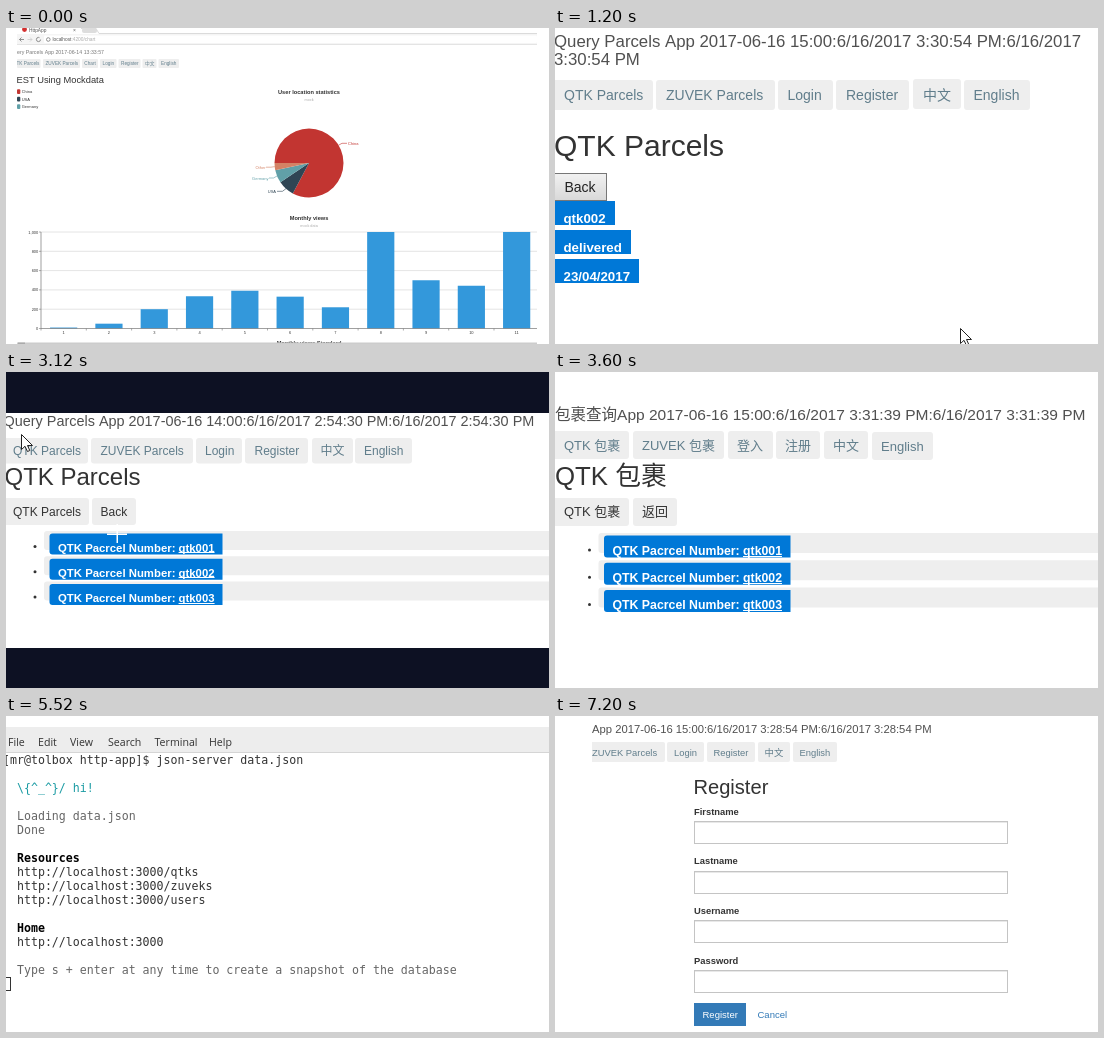
These frames come from a looping animation (543 px wide and 316 px high, 8400 ms). An HTML page with a canvas:

```html
<!DOCTYPE html>
<html lang="en">
<head>
<meta charset="utf-8">
<title>Parcel app tour</title>
<style>
  html, body { margin: 0; width: 100%; height: 100%; overflow: hidden; background: #fff; }
  canvas { display: block; }
</style>
</head>
<body>
<canvas id="stage" width="543" height="316"></canvas>
<script>
const W = 543, H = 316, HOLD = 1200;
const ctx = document.getElementById('stage').getContext('2d');
const SANS = '"Liberation Sans", Arial, "Noto Sans CJK SC", "Noto Sans CJK", sans-serif';
const MONO = '"DejaVu Sans Mono", monospace';
const MENU = '"Open Sans", "Noto Sans", sans-serif';
const INK = '#333', TITLE = '#505050', NAV = '#607d8b', CHIP = '#eee', BLUE = '#0078d7', LINK = '#337ab7';

function text(str, x, y, size, color = INK, { bold = false, align = 'left', font = SANS } = {}) {
  ctx.font = `${bold ? 'bold ' : ''}${size}px ${font}`;
  ctx.textAlign = align;
  ctx.fillStyle = color;
  ctx.fillText(str, x, y);
}

function rect(x, y, w, h, color, radius = 0) {
  ctx.fillStyle = color;
  ctx.beginPath();
  ctx.roundRect(x, y, w, h, radius);
  ctx.fill();
}

function line(points, color, width = 1) {
  ctx.strokeStyle = color;
  ctx.lineWidth = width;
  ctx.beginPath();
  points.forEach(([x, y]) => ctx.lineTo(x, y));
  ctx.stroke();
}

function disc(x, y, r, color) {
  ctx.fillStyle = color;
  ctx.beginPath();
  ctx.arc(x, y, r, 0, Math.PI * 2);
  ctx.fill();
}

// Each chip is [label, left, right, text x].
function chips(items, top, height, baseline, size, color = NAV, radius = 3) {
  for (const [label, left, right, tx] of items) {
    rect(left, top, right - left, height, CHIP, radius);
    text(label, tx, baseline, size, color);
  }
}

function pointer(x, y) {
  const shape = [[0, 0], [0, 15], [3.5, 11.8], [6, 17], [8.3, 16], [6, 11], [11, 11]];
  ctx.beginPath();
  shape.forEach(([dx, dy]) => ctx.lineTo(x + dx, y + dy));
  ctx.closePath();
  ctx.fillStyle = '#fff';
  ctx.fill();
  ctx.strokeStyle = '#222';
  ctx.lineWidth = 1;
  ctx.stroke();
}

function parcelList({ left, top, step, barH, blueH, blueW, size, drop }) {
  for (let i = 0; i < 3; i++) {
    const y = top + i * step, x = left + 14, base = y + drop;
    rect(left, y, W - left + 5, barH, CHIP, 3);
    rect(left + 5.5, y + 2.5, blueW, blueH, BLUE, [3, 0, 0, 3]);
    const label = 'QTK Pacrcel Number: ', code = 'qtk00' + (i + 1);
    text(label, x, base, size, '#fff', { bold: true });
    const start = x + ctx.measureText(label).width;
    text(code, start, base, size, '#fff', { bold: true });
    rect(start, Math.floor(base + 1), ctx.measureText(code).width, 1, '#fff');
    disc(left - 9, base - 5, 1.5, INK);
  }
}

function field(label, x, baseline, size, top, width, height) {
  text(label, x, baseline, size, INK, { bold: true });
  rect(x, top, width, height, '#fff');
  rect(x + 1, top + 1, width - 2, 1, '#e8e8e8');
  ctx.strokeStyle = '#c4c4c4';
  ctx.lineWidth = 1;
  ctx.strokeRect(x + .5, top + .5, width - 1, height - 1);
}

function browserBar() {
  line([[75, .5], [90, .5], [93, 5.5], [531, 5.5]], '#ccc', .7);
  rect(76, 0, 15, 5, '#ddd', 2);
  disc(18.5, 1.5, 2.4, '#d32f2f');
  text('HttpApp', 23, 3.5, 4.8, '#555');
  text('×', 67, 3.5, 5, '#555');
  rect(11, 6, 520, 10, '#f5f5f5');
  rect(38, 7.5, 493, 7.5, '#fff', 1);
  line([[11, 16.5], [531, 16.5]], '#ddd', .8);
  line([[15.5, 9.5], [13.5, 11.5], [15.5, 13.5]], '#777', .8);
  line([[13.5, 11.5], [18, 11.5]], '#777', .8);
  line([[24, 9.5], [26, 11.5], [24, 13.5]], '#ccc', .8);
  line([[21.5, 11.5], [26, 11.5]], '#ccc', .8);
  ctx.strokeStyle = '#777';
  ctx.lineWidth = .8;
  for (const [x, r, end] of [[32.5, 2.1, 5.2], [42.3, 1.8, 6.3]]) {
    ctx.beginPath();
    ctx.arc(x, 11.5, r, 0, end);
    ctx.stroke();
  }
  text('localhost', 46.5, 13.2, 4.8, '#555');
  text(':4200/chart', 46.5 + ctx.measureText('localhost').width, 13.2, 4.8, '#aaa');
}

function pieChart() {
  const cx = 303, cy = 135, r = 34.5, rad = Math.PI / 180;
  const slices = [
    ['#c23531', 180, 478], ['#2f4554', 118, 146], ['#61a0a8', 146, 168], ['#d48265', 168, 180]
  ];
  for (const [color, from, to] of slices) {
    ctx.fillStyle = color;
    ctx.beginPath();
    ctx.moveTo(cx, cy);
    ctx.arc(cx, cy, r, from * rad, to * rad);
    ctx.fill();
  }
  const labels = [
    ['China', 342, 116.8, 0, 'left', [[332.6, 117.2], [336, 115.3], [341, 115.3]]],
    ['USA', 270, 164.8, 1, 'right', [[280, 160.6], [276.5, 163.3], [271, 163.3]]],
    ['Germany', 262.5, 151.6, 2, 'right', [[271, 148], [267.5, 150], [263, 150]]],
    ['Other', 259.5, 140.7, 3, 'right', [[268.7, 138.6], [265, 139.2], [260, 139.2]]]
  ];
  for (const [name, x, y, i, align, path] of labels) {
    line(path, slices[i][0], .6);
    text(name, x, y, 4, slices[i][0], { align });
  }
}

function barChart() {
  const left = 35, right = 531, floor = 300.5, height = 96.5, step = 45.3;
  const views = [10, 50, 200, 335, 390, 330, 220, 1000, 500, 443, 1000];
  const yOf = v => floor - height * v / 1000;
  for (let v = 0; v <= 1000; v += 200) {
    const y = yOf(v);
    if (v) line([[left, y], [right, y]], '#ddd', .8);
    line([[33, y], [left, y]], '#777', .6);
    text(v.toLocaleString('en-US'), 32.3, y + 1.5, 4, INK, { align: 'right' });
  }
  views.forEach((v, i) => {
    const x = left + step * (i + .5);
    rect(x - 13.6, yOf(v), 27.2, floor - yOf(v), '#3398db');
    text(i + 1, x, 306.3, 4, INK, { align: 'center' });
    line([[left + i * step, floor], [left + i * step, floor + 2]], '#777', .6);
  });
  line([[left, yOf(1000)], [left, floor], [right, floor]], '#777', .7);
}

function chartPage() {
  browserBar();
  text('ery Parcels App 2017-06-14 13:33:57', 11, 26.2, 5.24, '#777');
  chips([
    ['TK Parcels', 11, 34.5, 10.5], ['ZUVEK Parcels', 37, 74, 39.5], ['Chart', 76, 92, 78.3],
    ['Login', 94, 110.5, 96.6], ['Register', 112.5, 134.5, 115], ['中文', 136.5, 150.5, 139],
    ['English', 152.5, 173, 155]
  ], 31, 9, 37.3, 4.7, NAV, 1);
  rect(0, 28, 11, 15, '#fff');
  text('EST Using Mockdata', 10.5, 54.6, 9.3);
  [['China', '#c23531'], ['USA', '#2f4554'], ['Germany', '#61a0a8']].forEach(([name, color], i) => {
    rect(11, 61.3 + i * 7.5, 3.3, 4.7, color, 1);
    text(name, 15.7, 65.2 + i * 7.5, 4, INK);
  });
  const title = { bold: true, align: 'center' }, sub = { align: 'center' };
  text('User location statistics', 303, 66.3, 5.66, INK, title);
  text('mock', 303, 73.4, 3.8, '#aaa', sub);
  pieChart();
  text('Monthly views', 303, 191.7, 5.66, INK, title);
  text('mock data', 303, 198.6, 3.8, '#aaa', sub);
  barChart();
  text('Monthly views Standard', 303, 316.7, 5.66, INK, title);
  rect(11, 314.5, 520, 1.5, '#ccc');
  rect(12, 314.5, 7, 1.5, '#aaa');
}

function parcelPage() {
  text('Query Parcels App 2017-06-16 15:00:6/16/2017 3:30:54 PM:6/16/2017', -1, 19, 16.8, TITLE);
  text('3:30:54 PM', -1, 37, 16.8, TITLE);
  chips([
    ['QTK Parcels', -4, 98, 9], ['ZUVEK Parcels', 101, 220, 111], ['Login', 223, 278, 232.5],
    ['Register', 281, 354, 291], ['English', 409, 475, 418.5]
  ], 52, 30, 72, 14);
  chips([['中文', 358, 406, 368]], 51, 30, 72, 14);
  text('QTK Parcels', -1, 128, 30);
  const shade = ctx.createLinearGradient(0, 145, 0, 173);
  shade.addColorStop(0, '#f2f2f2');
  shade.addColorStop(1, '#d8d8d8');
  rect(-2, 145, 54, 28, '#777');
  rect(-2, 146, 53, 26, shade);
  text('Back', 9.5, 164, 14, '#222');
  [['qtk002', 60], ['delivered', 76], ['23/04/2017', 84]].forEach(([label, width], i) => {
    rect(0, 173 + i * 29, width, 24, BLUE);
    text(label, 8.5, 195 + i * 29, 13.3, '#fff', { bold: true });
  });
  pointer(405.5, 300.5);
}

function englishList() {
  rect(0, 0, W, 41, '#0d1123');
  rect(0, 276, W, 40, '#0d1123');
  text('Query Parcels App 2017-06-16 14:00:6/16/2017 2:54:30 PM:6/16/2017 2:54:30 PM', -2.5, 54, 14.43, TITLE);
  chips([
    ['QTK Parcels', -4, 82, 7], ['ZUVEK Parcels', 85, 187, 94.5], ['Login', 190, 236, 199],
    ['Register', 239, 302, 248.5], ['中文', 306, 347, 314.5], ['English', 349, 406, 358]
  ], 66, 25.5, 83, 12);
  text('QTK Parcels', -1.5, 113, 24);
  chips([['QTK Parcels', -4, 83, 7], ['Back', 86, 130, 94.5]], 126, 27, 144, 12, INK);
  parcelList({ left: 38, top: 159, step: 25.2, barH: 19, blueH: 21, blueW: 173, size: 11.37, drop: 20.6 });
  rect(110.5, 152, 1.5, 19, '#fff');
  rect(101, 161.5, 20, 1.5, '#fff');
  pointer(15.5, 62.5);
}

function chineseList() {
  text('包裹查询App 2017-06-16 15:00:6/16/2017 3:31:39 PM:6/16/2017 3:31:39 PM', 0, 48, 15.53, TITLE);
  chips([
    ['QTK 包裹', -4, 74, 9], ['ZUVEK 包裹', 78, 169, 87], ['登入', 173, 218, 182],
    ['注册', 221, 265, 230], ['中文', 269, 313, 278]
  ], 59, 28, 78, 13);
  chips([['English', 317, 378, 326]], 60, 28, 78.5, 13);
  text('QTK 包裹', 0, 113, 25.8);
  chips([['QTK 包裹', -4, 74, 9], ['返回', 78, 122, 87]], 126, 28, 144, 13, INK);
  parcelList({ left: 43.5, top: 161, step: 27.2, barH: 20, blueH: 22, blueW: 186.5, size: 12.3, drop: 22 });
}

function terminal() {
  rect(0, 11, W, 25.5, '#ededed');
  rect(0, 36, W, 1, '#d5d5d5');
  [['File', 2], ['Edit', 32], ['View', 64], ['Search', 102], ['Terminal', 148.5], ['Help', 203]]
    .forEach(([label, x]) => text(label, x, 30, 10.6, INK, { font: MENU }));
  const left = -3, GREY = '#666';
  const put = (row, str, color = INK, bold = false) =>
    text(str, left, 48 + row * 14, 11.6, color, { bold, font: MONO });
  put(0, '[mr@tolbox http-app]$ json-server data.json');
  put(2, '  \\{^_^}/ hi!', '#1a9ba3');
  put(4, '  Loading data.json', GREY);
  put(5, '  Done', GREY);
  put(7, '  Resources', '#000', true);
  ['/qtks', '/zuveks', '/users'].forEach((path, i) => put(8 + i, '  http://localhost:3000' + path));
  put(12, '  Home', '#000', true);
  put(13, '  http://localhost:3000');
  put(15, '  Type s + enter at any time to create a snapshot of the database', GREY);
  ctx.strokeStyle = INK;
  ctx.lineWidth = 1;
  ctx.strokeRect(-2.5, 261.5, 7, 13);
}

function loginPage() {
  text('Query Parcels App 2017-06-16 15:00:6/16/2017 3:28:04 PM:6/16/2017 3:28:04 PM', -4, 27, 13.93, TITLE);
  chips([
    ['QTK Parcels', -4, 77, 3.3], ['ZUVEK Parcels', 80, 179, 88], ['Login', 182, 226, 190],
    ['Register', 229, 290, 238], ['中文', 294, 333, 301.5], ['English', 336, 391, 344]
  ], 39, 25, 56, 11.7);
  text('Login', 222, 103, 24.9);
  field('Username', 222.5, 129, 11.7, 138, 330, 28);
  field('Password', 222.5, 190, 11.7, 199, 330, 28);
  rect(222.5, 239, 50, 29, LINK);
  text('Login', 233, 258, 11.8, '#fff');
  text('Register', 286, 258, 11.8, LINK);
}

function registerPage() {
  text('App 2017-06-16 15:00:6/16/2017 3:28:54 PM:6/16/2017 3:28:54 PM', 37, 17, 11.26, TITLE);
  chips([
    ['ZUVEK Parcels', 33, 110, 37], ['Login', 112, 149, 119], ['Register', 152, 200, 158.5],
    ['中文', 203, 235, 209.5], ['English', 238, 282, 244.5]
  ], 26, 20, 39.5, 9.4, NAV, 2);
  rect(30, 25, 7, 22, '#fff');
  text('Register', 138.5, 78, 20.1);
  ['Firstname', 'Lastname', 'Username', 'Password'].forEach((label, i) =>
    field(label, 139, 98.8 + i * 49.6, 9.4, Math.round(105 + i * 49.7), 314, 23));
  rect(139, 287, 52, 23, LINK);
  text('Register', 147.5, 302, 9.5, '#fff');
  text('Cancel', 202.5, 302, 9.5, LINK);
}

const scenes = [chartPage, parcelPage, englishList, chineseList, terminal, loginPage, registerPage];
const start = performance.now();

function tick() {
  const elapsed = performance.now() - start;
  rect(0, 0, W, H, '#fff');
  scenes[Math.floor(elapsed / HOLD) % scenes.length]();
  requestAnimationFrame(tick);
}
tick();
</script>
</body>
</html>
```
